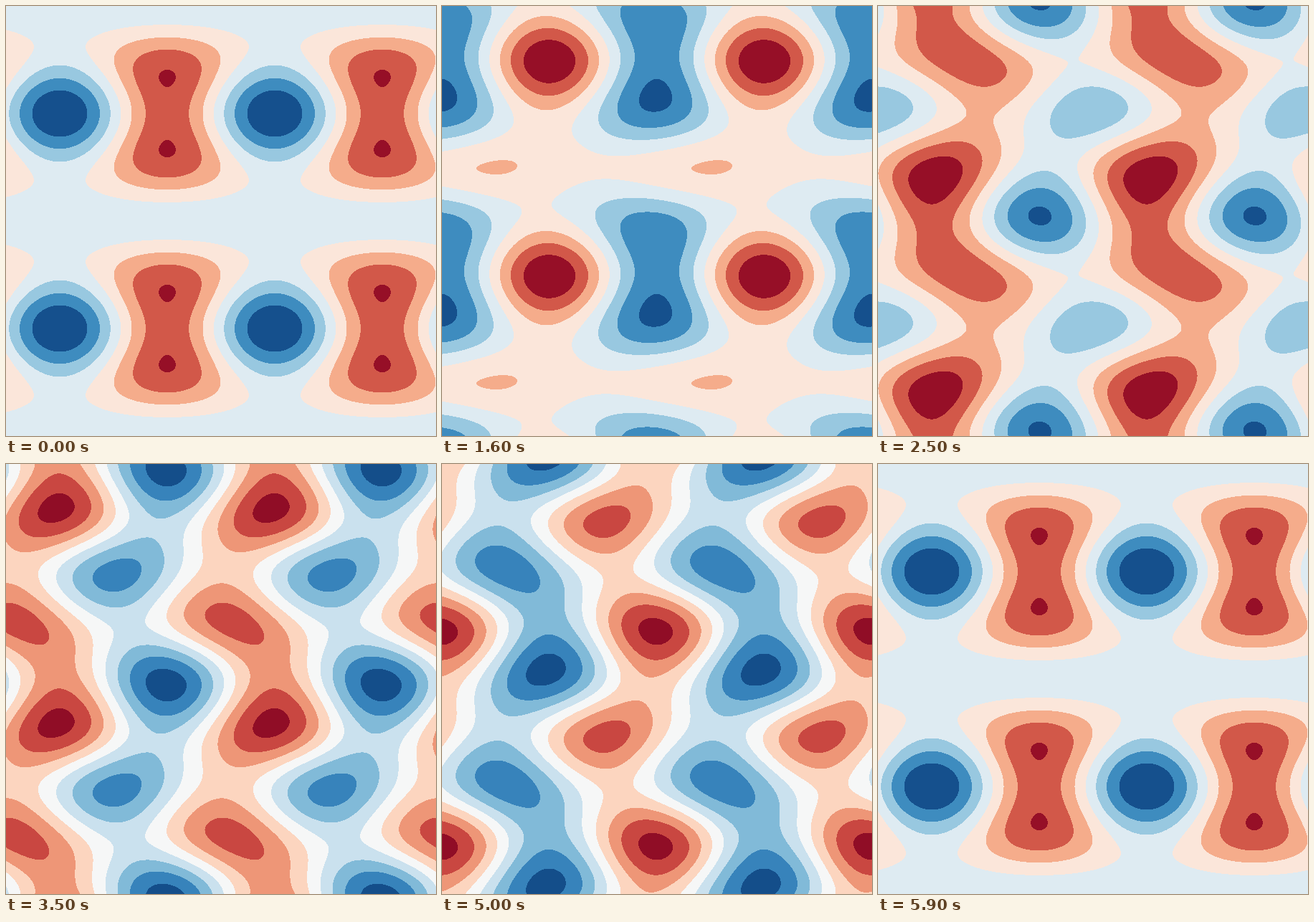
Animation of 600x600 px, one loop 6000 ms. Source, as an HTML page with a canvas:

```html
<!DOCTYPE html>
<html lang="en">
<head>
<meta charset="utf-8">
<title>Contour waves</title>
<style>
  html, body { margin: 0; width: 100%; height: 100%; overflow: hidden; }
  canvas { display: block; width: 600px; height: 600px; }
</style>
</head>
<body>
<canvas id="stage" width="600" height="600"></canvas>
<script>
const TILE = 300;          // the field repeats every 300 px
const SIDE = TILE + 1;     // samples sit on pixel corners
const FRAMES = 60;
const FRAME_MS = 100;
const TAU = 2 * Math.PI;
const STOPS = ['67001f', 'b2182b', 'd6604d', 'f4a582', 'fddbc7', 'f7f7f7',
               'd1e5f0', '92c5de', '4393c3', '2166ac', '053061']
  .map(hex => [0, 2, 4].map(i => parseInt(hex.slice(i, i + 2), 16)));

const ctx = document.getElementById('stage').getContext('2d');
const image = ctx.createImageData(TILE, TILE);
const pixels = new Uint32Array(image.data.buffer);
const field = new Float64Array(SIDE * SIDE);
const angle = Array.from({ length: SIDE }, (_, i) => i / TILE * TAU);

// Diverging red-blue map, quantised to 256 entries, as a packed ABGR pixel.
function colour(v) {
  const pos = Math.floor(v * 256) / 255 * 10;
  const i = Math.min(9, Math.floor(pos));
  const [r, g, b] = STOPS[i].map((c, k) => Math.round(c + (STOPS[i + 1][k] - c) * (pos - i)));
  return (255 << 24 | b << 16 | g << 8 | r) >>> 0;
}

// Smallest round step that splits the range into at most 8 parts.
function niceStep(range) {
  const raw = range / 8;
  const scale = 10 ** Math.floor(Math.log10(raw));
  return scale * [1, 1.5, 2, 2.5, 3, 4, 5, 6, 8, 10].find(s => s * scale >= raw - 1e-12);
}

function draw(frame) {
  const t = TAU * frame / (FRAMES - 1);
  const ahead = angle.map(x => Math.sin(x - t));
  const back = angle.map(x => Math.sin(x + t));
  let min = Infinity, max = -Infinity;
  for (let y = 0, n = 0; y < SIDE; y++) {
    const c = Math.cos(angle[y] - t);
    const d = Math.cos(angle[y] + t);
    for (let x = 0; x < SIDE; x++, n++) {
      const z = back[x] - ahead[x] * c + c * d;
      field[n] = z;
      if (z < min) min = z;
      if (z > max) max = z;
    }
  }

  const step = niceStep(max - min);
  const low = Math.floor(min / step + 1e-9);
  const bands = Math.ceil(max / step - 1e-9) - low;
  const palette = Array.from({ length: bands }, (_, k) => colour((k + 0.5) / bands));

  // Hard edges: a pixel takes the highest band that touches it.
  for (let y = 0, n = 0; y < TILE; y++) {
    for (let x = 0; x < TILE; x++, n++) {
      const i = y * SIDE + x;
      const z = Math.max(field[i], field[i + 1], field[i + SIDE], field[i + SIDE + 1]);
      const k = Math.floor(z / step) - low;
      pixels[n] = palette[Math.max(0, Math.min(bands - 1, k))];
    }
  }
  for (const x of [0, TILE]) for (const y of [0, TILE]) ctx.putImageData(image, x, y);
}

let shown = -1;
function tick() {
  const frame = Math.floor(performance.now() / FRAME_MS) % FRAMES;
  if (frame !== shown) draw(shown = frame);
  requestAnimationFrame(tick);
}
tick();
</script>
</body>
</html>
```
